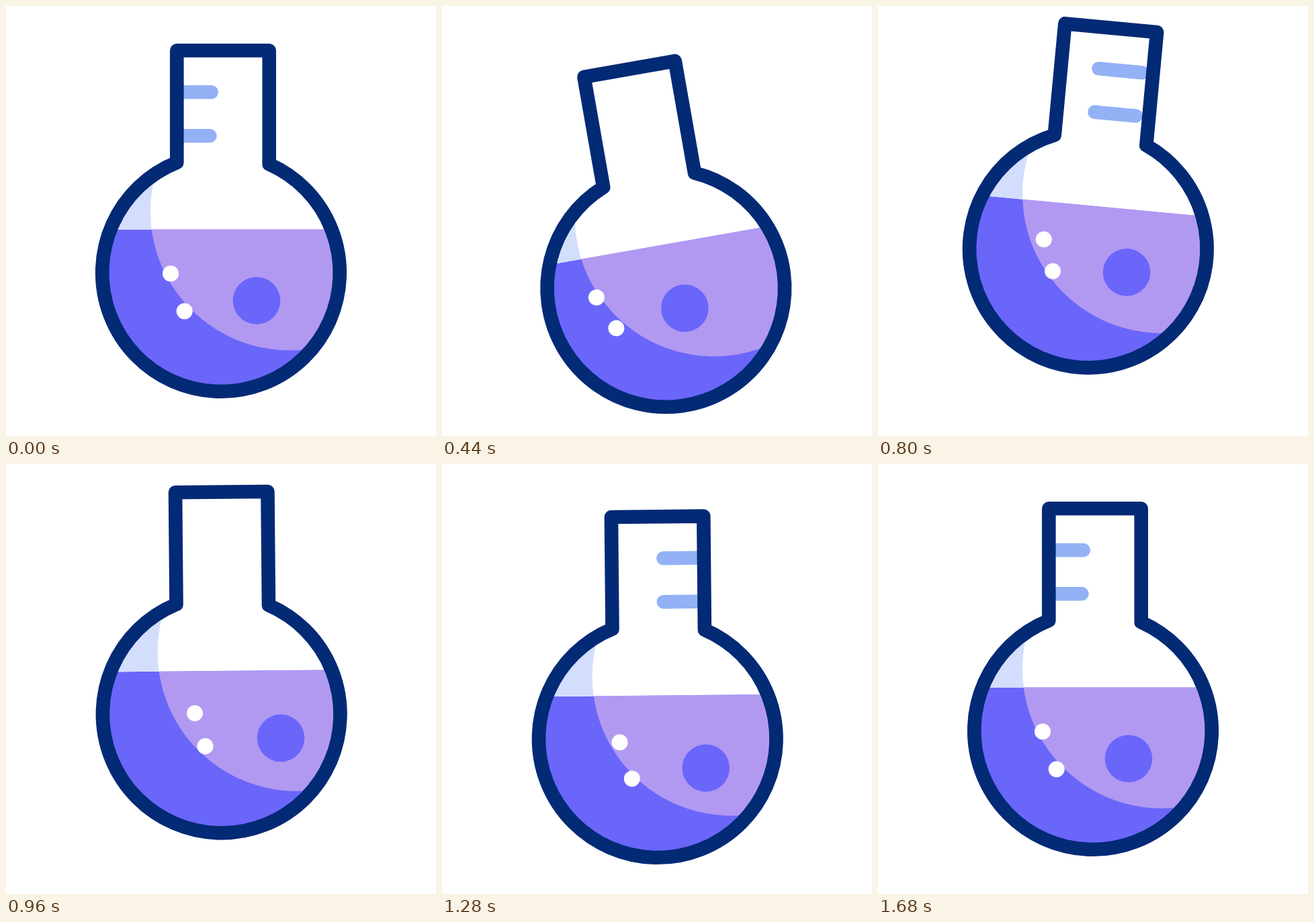
Animation, 640 px wide and 640 px high, one loop 2 s. Source, as an HTML page with a canvas:

```html
<!DOCTYPE html>
<html lang="en">
<head>
<meta charset="utf-8">
<title>Swirling flask</title>
<style>
html, body { margin: 0; width: 100%; height: 100%; overflow: hidden; background: #fff; }
canvas { display: block; width: 100vmin; height: 100vmin; }
</style>
</head>
<body>
<canvas id="stage" width="640" height="640"></canvas>
<script>
const ctx = document.getElementById("stage").getContext("2d");
const LOOP = 2000, STEP = 40;
const NAVY = "#032a75", BLUE = "#6a66f9", LILAC = "#b199f2", PALE = "#d3defd", MARK = "#93b1f5", WHITE = "#fff";

// Eased track through [time, value] keys; holds before the first and after the last.
function track(...keys) {
  return t => {
    if (t <= keys[0][0]) return keys[0][1];
    for (let i = 1; i < keys.length; i++) {
      const [t0, v0] = keys[i - 1], [t1, v1] = keys[i];
      if (t < t1) {
        const p = (t - t0) / (t1 - t0);
        return v0 + (v1 - v0) * p * p * (3 - 2 * p);
      }
    }
    return keys[keys.length - 1][1];
  };
}

const tilt = track([93, 0], [495, -10.5], [780, 5.5], [1044, -2.4], [1385, 0]);
const lift = track([85, 0], [485, 25], [816, -35.5], [1280, 12], [1517, 0]);
const shineX = track([93, 0], [529, -15], [1093, 15], [1518, 0]);
const markX = track([90, 0], [570, -85], [955, 155], [1686, 0]);
const bubbleX = (left, right) => track([90, 0], [540, left], [1006, right], [1555, 0]);
const bubbleY = (up, down) => track([90, 0], [740, up], [1200, down], [1430, 0]);

const bubbles = [
  { x: 53, y: 41.5, r: 35.3, color: BLUE, dx: bubbleX(-35, 37), dy: bubbleY(-13, 3.7) },
  { x: -75, y: 1.3, r: 12, color: WHITE, dx: bubbleX(-33.5, 37.3), dy: bubbleY(-10, 4.8) },
  { x: -54.3, y: 57.3, r: 12, color: WHITE, dx: bubbleX(-33, 31.5), dy: bubbleY(-20.5, 2.4) }
];

// Flask geometry, relative to the middle of the bulb.
const RADIUS = 176.8, LEFT = -65.7, RIGHT = 71.7, TOP = -330.7, SURFACE = -64.5;
const flask = new Path2D();
flask.moveTo(LEFT, TOP);
flask.lineTo(RIGHT, TOP);
flask.arc(0, 0, RADIUS, -Math.acos(RIGHT / RADIUS), -Math.acos(LEFT / RADIUS));
flask.closePath();

function disc(x, y, r, color) {
  ctx.fillStyle = color;
  ctx.beginPath();
  ctx.arc(x, y, r, 0, Math.PI * 2);
  ctx.fill();
}

// One band of the bulb with the moving shine on top of its base colour.
function band(y, height, base, shine, dx) {
  ctx.save();
  ctx.beginPath();
  ctx.rect(-200, y, 400, height);
  ctx.clip();
  ctx.fillStyle = base;
  ctx.fillRect(-200, y, 400, height);
  disc(102 + dx, -91.5, 207, shine);
  ctx.restore();
}

function mark(x, y, length) {
  ctx.fillStyle = MARK;
  ctx.beginPath();
  ctx.roundRect(x, y - 10.25, length, 20.5, 10.25);
  ctx.fill();
}

function draw(t) {
  ctx.setTransform(1, 0, 0, 1, 0, 0);
  ctx.fillStyle = WHITE;
  ctx.fillRect(0, 0, 640, 640);
  ctx.translate(320, 320 + lift(t));
  ctx.rotate(tilt(t) * Math.PI / 180);
  ctx.translate(0, 77);

  ctx.save();
  ctx.clip(flask);
  const dx = shineX(t);
  band(-180, 180 + SURFACE, PALE, WHITE, dx);
  band(SURFACE, 260, BLUE, LILAC, dx);
  for (const b of bubbles) disc(b.x + b.dx(t), b.y + b.dy(t), b.r, b.color);
  ctx.fillStyle = WHITE;
  ctx.fillRect(LEFT, TOP, RIGHT - LEFT, 170);
  mark(-89.5 + markX(t), -268.7, 85.5);
  mark(-88.3 + markX(t) * 0.985, -203.7, 82);
  ctx.restore();

  ctx.strokeStyle = NAVY;
  ctx.lineWidth = 20.6;
  ctx.lineJoin = "round";
  ctx.stroke(flask);
}

const start = performance.now();
function tick() {
  const t = (performance.now() - start) % LOOP;
  draw(Math.floor(t / STEP) * STEP);
  requestAnimationFrame(tick);
}
tick();
</script>
</body>
</html>
```
